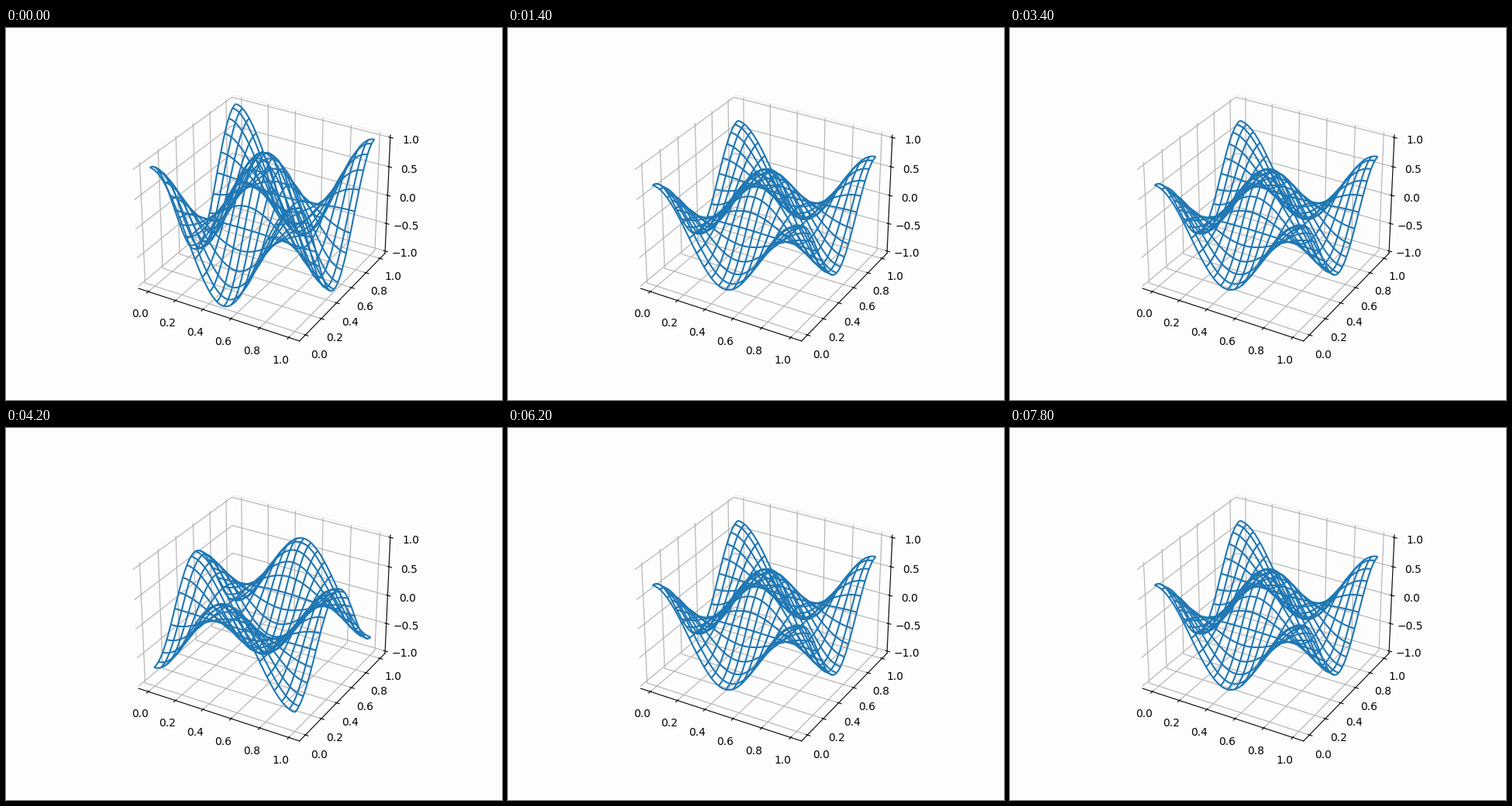
Recreate the animation shown at these times as a matplotlib script. Size 640 by 480 pixels, loop 8 s.

```python
import numpy as np
import matplotlib.pyplot as plt
from matplotlib.animation import FuncAnimation

PAPER = "#fdfdfd"
FRAMES, INTERVAL = 40, 200
PHASES = 8  # frames per oscillation

fig = plt.figure(figsize=(6.4, 4.8), dpi=100, facecolor=PAPER)
ax = fig.add_subplot(projection="3d")
ax.set_facecolor(PAPER)
ax.view_init(elev=30, azim=-60)

grid = np.linspace(0, 1, 100)
X, Y = np.meshgrid(grid, grid)
mode = np.cos(2 * np.pi * X) * np.cos(2 * np.pi * Y)

# one wireframe per phase of the standing wave
wires = [
    ax.plot_wireframe(X, Y, mode * np.cos(2 * np.pi * k / PHASES),
                      rstride=5, cstride=5, color="#1f77b4", linewidth=1.5)
    for k in range(PHASES)
]

pad = 0.05 + 1.1 / 48
ax.set_xlim(-pad, 1 + pad)
ax.set_ylim(-pad, 1 + pad)
ax.set_zlim(-1 - 1 / 24, 1 + 1 / 24)
ax.set_xticks(np.linspace(0, 1, 6))
ax.set_yticks(np.linspace(0, 1, 6))
ax.set_zticks(np.linspace(-1, 1, 5))

for axis in (ax.xaxis, ax.yaxis, ax.zaxis):
    axis.set_pane_color((253 / 255, 253 / 255, 253 / 255, 1))
ax.yaxis.pane.set_edgecolor("#f0f0f0")


def draw(frame):
    for k, wire in enumerate(wires):
        wire.set_visible(k == frame % PHASES)
    return wires


anim = FuncAnimation(fig, draw, frames=FRAMES, interval=INTERVAL,
                     repeat=True, repeat_delay=0, blit=False)
plt.show()
```
